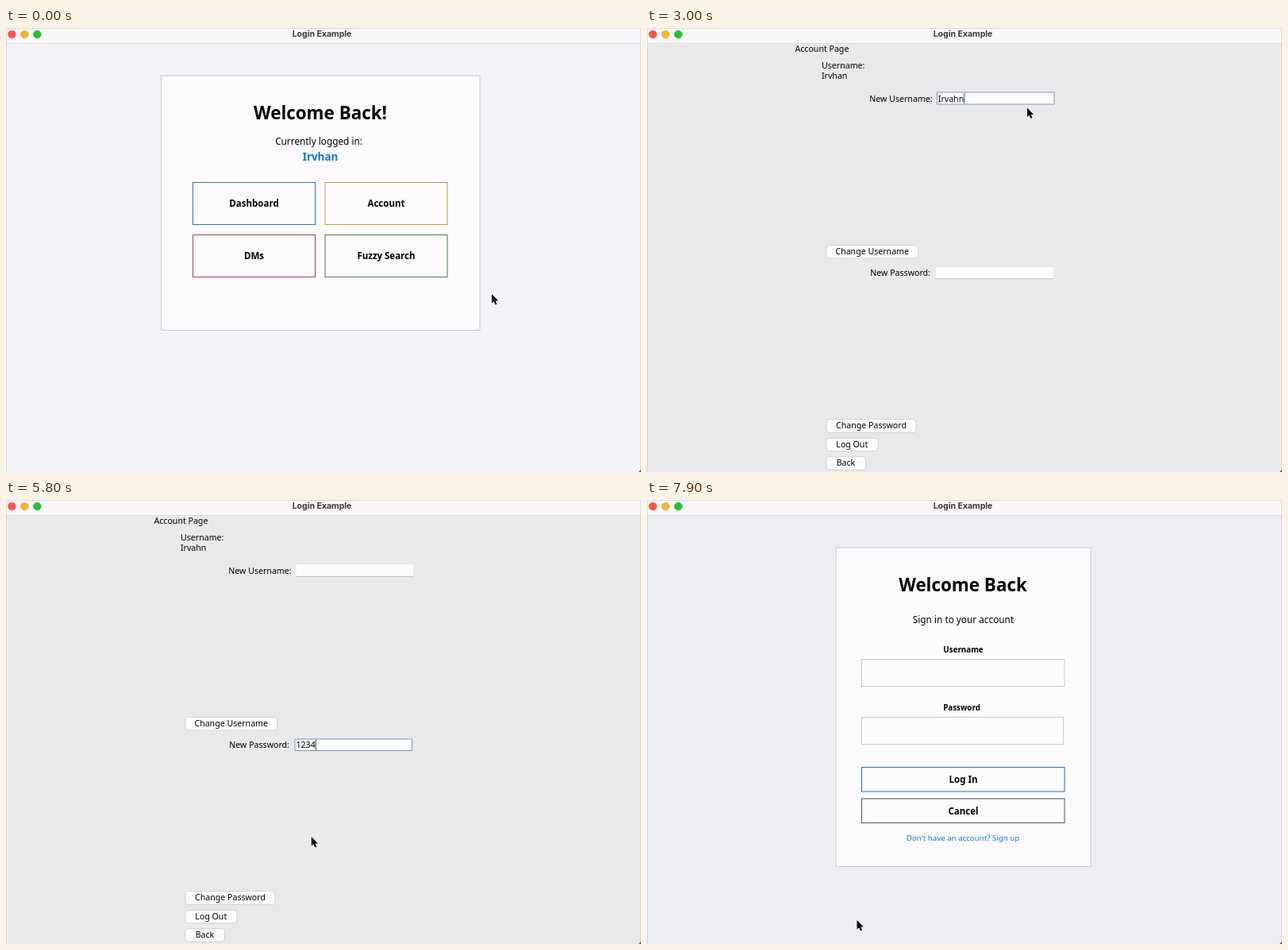
Recreate the animation shown at these times as an HTML page. Size 800x559 px, loop 8000 ms.

```html
<!DOCTYPE html>
<html lang="en">
<head>
<meta charset="utf-8">
<title>Login Example</title>
<style>
  html, body { margin: 0; width: 100%; height: 100%; overflow: hidden; background: #e9e8ea; }
  svg { display: block; width: 800px; height: 559px; }
  text { font: 10.6px "Noto Sans", "Open Sans", sans-serif; fill: #000; white-space: pre; }
  .mid { text-anchor: middle; }
  .bar { font: 700 10.5px Inter, Roboto, sans-serif; text-anchor: middle; fill: #3b393b; }
  .h1 { font-size: 22.4px; font-weight: 700; }
  .sub { font-size: 11.8px; }
  .user { font-size: 13.4px; font-weight: 700; fill: #0f72dc; }
  .act { font-size: 11.5px; font-weight: 700; }
  .lbl { font-size: 9.8px; font-weight: 700; }
  .link { font-size: 9.7px; fill: #0c78dd; }
  .card { fill: #fdfbfe; stroke: #c9c8cb; }
  .box { fill: none; stroke: #c9c9cc; }
  .btn rect { fill: #fefdfe; stroke: #d3d1d4; }
  .btn.focus rect { stroke: #7d8895; stroke-width: 1.4; }
  .btn.down rect { fill: #efeef1; }
  .field rect { fill: #fefdfe; }
  .field path { stroke: #c3c1c4; }
  .field.focus rect { stroke: #7f9bb8; }
  .field.focus path { stroke: none; }
  .caret { fill: #000; }
  .lights circle { stroke-width: .6; }
  .red { fill: #fc514c; stroke: #e2453f; }
  .amber { fill: #f6b42b; stroke: #dea024; }
  .green { fill: #28c034; stroke: #22a82c; }
  .off { fill: #d5d3d5; stroke: #c3c1c3; }
  .idle circle { fill: #d5d3d5; stroke: #c3c1c3; }
  .idle .bar { fill: #a5a3a5; }
  #ok rect { fill: url(#blue); }
  #ok.focus rect { stroke: #3d6ea8; }
</style>
</head>
<body>
<svg viewBox="0 0 800 559">
  <defs>
    <linearGradient id="blue" x2="0" y2="1">
      <stop stop-color="#2f92ff"/><stop offset="1" stop-color="#0466f6"/>
    </linearGradient>
    <linearGradient id="steel" x2="0" y2="1">
      <stop stop-color="#fcfcfc"/><stop offset="1" stop-color="#c2c2c4"/>
    </linearGradient>
    <filter id="shade" x="-30%" y="-40%" width="160%" height="200%">
      <feDropShadow dx="0" dy="14" stdDeviation="14" flood-color="#000" flood-opacity=".52"/>
    </filter>
  </defs>

  <g id="home">
    <rect width="800" height="559" fill="#f3f4f8"/>
    <rect class="card" x="195.5" y="60" width="401.5" height="320.5"/>
    <text class="mid h1" x="396" y="115">Welcome Back!</text>
    <text class="mid sub" x="394" y="147">Currently logged in:</text>
    <text class="mid user" x="396" y="166.5">Irvhan</text>
    <g fill="none">
      <rect x="235.5" y="194.5" width="154" height="53" stroke="#2f73b8"/>
      <rect x="402" y="194.5" width="154" height="53" stroke="#bda136"/>
      <rect x="235.5" y="260.5" width="154" height="53" stroke="#a2464f"/>
      <rect x="402" y="260.5" width="154" height="53" stroke="#428549"/>
    </g>
    <text class="mid act" x="312.5" y="225">Dashboard</text>
    <text class="mid act" x="479" y="225">Account</text>
    <text class="mid act" x="312.5" y="291">DMs</text>
    <text class="mid act" x="479" y="291">Fuzzy Search</text>
  </g>

  <g id="account">
    <rect width="800" height="559" fill="#e9e8ea"/>
    <text x="186.5" y="30">Account Page</text>
    <text x="220" y="51">Username:</text>
    <text id="current" x="220" y="64"></text>
    <text x="280.3" y="92.7">New Username:</text>
    <g id="nameField" class="field">
      <rect x="365.5" y="81" width="147.5" height="15"/><path d="M365 96.3H513.5"/>
      <text x="366.8" y="92.7"></text><rect class="caret" y="82.5" width="1" height="12.5"/>
    </g>
    <g id="nameBtn" class="btn">
      <rect x="226" y="273.5" width="115.5" height="16.5" rx="3.8"/>
      <text class="mid" x="283.7" y="285">Change Username</text>
    </g>
    <text x="281.3" y="312.2">New Password:</text>
    <g id="passField" class="field">
      <rect x="364" y="301" width="147.5" height="14.5"/><path d="M363.5 315.7H512"/>
      <text x="365.5" y="312.2"></text><rect class="caret" y="302" width="1" height="12.5"/>
    </g>
    <g id="passBtn" class="btn">
      <rect x="226" y="492.7" width="113" height="16.8" rx="3.8"/>
      <text class="mid" x="282.5" y="504.3">Change Password</text>
    </g>
    <g id="outBtn" class="btn">
      <rect x="226" y="516.2" width="65" height="16.5" rx="3.8"/>
      <text class="mid" x="258.3" y="527.8">Log Out</text>
    </g>
    <g class="btn">
      <rect x="226" y="539.6" width="49.5" height="16.5" rx="3.8"/>
      <text class="mid" x="250.5" y="551.3">Back</text>
    </g>
  </g>

  <g id="login">
    <rect width="800" height="559" fill="#ebedf2"/>
    <rect class="card" x="238" y="60" width="321" height="401.5"/>
    <text class="mid h1" x="398" y="115">Welcome Back</text>
    <text class="mid sub" x="398.5" y="155.3">Sign in to your account</text>
    <text class="mid lbl" x="398.5" y="191.5">Username</text>
    <rect class="box" x="270.5" y="200.5" width="255.5" height="34"/>
    <text class="mid lbl" x="396.5" y="264.7">Password</text>
    <rect class="box" x="270.5" y="273.7" width="254" height="34"/>
    <rect x="270.5" y="336.5" width="255.5" height="30.5" fill="none" stroke="#2b6cb3"/>
    <text class="mid act" x="398.5" y="356.3">Log In</text>
    <rect x="270.5" y="376" width="255.5" height="30.5" fill="none" stroke="#55555a"/>
    <text class="mid act" x="398.5" y="395.8">Cancel</text>
    <text class="mid link" x="398" y="429">Don't have an account? Sign up</text>
  </g>

  <g id="frame">
    <rect width="800" height="19.5" fill="#f9f7f9"/>
    <path d="M0 19.5H800" stroke="#dcdadd"/>
    <path d="M.25 559V.25H799.75V559" fill="none" stroke="#bdbbbe" stroke-width=".6"/>
    <path d="M800 556V559H797Z" fill="#55565a"/>
    <g class="lights">
      <circle class="red" cx="7.4" cy="8" r="4.8"/>
      <circle class="amber" cx="23.4" cy="8" r="4.8"/>
      <circle class="green" cx="39.4" cy="8" r="4.8"/>
    </g>
    <text class="bar" x="398" y="11.3">Login Example</text>
  </g>

  <g id="dialog">
    <rect x="269" y="219.7" width="259" height="139" rx="6.5" fill="#ebe9eb" stroke="#b9b7ba" stroke-width=".7" filter="url(#shade)"/>
    <path d="M269.3 242V226Q269.3 220 275.5 220H521.5Q527.7 220 527.7 226V242Z" fill="#f9f7f9"/>
    <path d="M269 242.3H528" stroke="#d5d3d6"/>
    <g class="lights">
      <circle class="red" cx="280" cy="230.8" r="4.8"/>
      <circle class="off" cx="296.2" cy="230.8" r="4.8"/>
      <circle class="off" cx="312.3" cy="230.8" r="4.8"/>
    </g>
    <text class="bar" x="398.3" y="234.3">Message</text>
    <rect x="291.7" y="257" width="47.3" height="49" rx="1.5" fill="url(#steel)" stroke="#47474a"/>
    <circle cx="315.3" cy="282" r="14" fill="#141414"/>
    <text id="note" x="363.5" y="284"></text>
    <g id="ok">
      <rect x="453" y="324.7" width="52.5" height="16.6" rx="3.8"/>
      <text class="mid" x="479" y="336.6">OK</text>
    </g>
  </g>

  <path id="pointer" d="M0 0V11.6L2.7 9.2 4.5 13.4 6.5 12.5 4.7 8.5H8.2Z" fill="#000" stroke="#fff" stroke-width=".9" paint-order="stroke"/>
</svg>
<script>
  const LOOP = 8000, STEP = 100;
  const OLD = "Irvhan", NEW = "Irvahn", PIN = "1234";
  const nameKeys = [1600, 1900, 2000, 2300, 2400, 2700];
  const pinKeys = [5000, 5100, 5300, 5400];

  // time, x, y of the pointer tip
  const path = [
    [0, 612, 335], [100, 612, 335], [500, 476, 232], [700, 476, 230],
    [1000, 490, 87], [1300, 491.5, 84], [2900, 491.5, 86], [3500, 322, 281],
    [3700, 322, 281], [3900, 452.5, 288.5], [4100, 479, 334], [4500, 479, 336],
    [4800, 454.5, 310.5], [4900, 454, 309], [5500, 440, 345], [6100, 329.5, 503],
    [6400, 329.5, 503], [6900, 479, 335], [7100, 479, 335], [7300, 276, 520],
    [7400, 264.5, 529], [LOOP, 264.5, 529]
  ];

  const $ = id => document.getElementById(id);
  const show = (el, on) => { el.style.display = on ? "" : "none"; };
  const within = (t, a, b) => t >= a && t < b;

  function pointerAt(t) {
    const i = path.findIndex(p => p[0] > t);
    const [t0, x0, y0] = path[i - 1], [t1, x1, y1] = path[i];
    const k = (t - t0) / (t1 - t0), e = k * k * (3 - 2 * k);
    return [x0 + (x1 - x0) * e, y0 + (y1 - y0) * e];
  }

  function drawField(id, value, focus, since, t) {
    const el = $(id), text = el.querySelector("text"), caret = el.querySelector(".caret");
    text.textContent = value;
    el.classList.toggle("focus", focus);
    show(caret, focus && (t - since) % 1000 < 500);
    caret.setAttribute("x", +text.getAttribute("x") + (value ? text.getComputedTextLength() : 0));
  }

  function drawButton(id, focus, down) {
    $(id).classList.toggle("focus", focus);
    $(id).classList.toggle("down", down);
  }

  function typed(word, keys, t) {
    const n = keys.filter(k => k <= t).length;
    return [word.slice(0, n), n ? keys[n - 1] : 0];
  }

  function draw(t) {
    show($("home"), t < 700);
    show($("account"), within(t, 700, 7800));
    show($("login"), t >= 7800);

    const first = within(t, 3800, 4500), second = within(t, 6400, 7200);
    show($("dialog"), first || second);
    $("frame").classList.toggle("idle", first || second);
    $("note").textContent = first ? "Username changed to " + NEW : "Password updated for " + NEW;
    $("ok").classList.toggle("focus", within(t, 3900, 4500) || within(t, 6500, 7200));

    $("current").textContent = t < 4500 ? OLD : NEW;
    const [name, nameTime] = typed(NEW, nameKeys, t);
    const [pin, pinTime] = typed(PIN, pinKeys, t);
    drawField("nameField", t < 4500 ? name : "", within(t, 1200, 3600), nameTime || 1200, t);
    drawField("passField", pin, within(t, 4900, 6200), pinTime || 4900, t);

    drawButton("nameBtn", within(t, 3600, 3800) || within(t, 4500, 4900), within(t, 3600, 3800));
    drawButton("passBtn", within(t, 6200, 6500) || within(t, 7200, 7600), within(t, 6200, 6500));
    drawButton("outBtn", within(t, 7600, 7800), within(t, 7600, 7800));

    // the pointer hides while typing
    show($("pointer"), !within(t, 1600, 2900) && !within(t, 5000, 5500));
    $("pointer").setAttribute("transform", `translate(${pointerAt(t)})`);
  }

  const start = performance.now();
  function tick() {
    const t = (performance.now() - start) % LOOP;
    draw(Math.floor(t / STEP) * STEP);
    requestAnimationFrame(tick);
  }
  tick();
</script>
</body>
</html>
```
